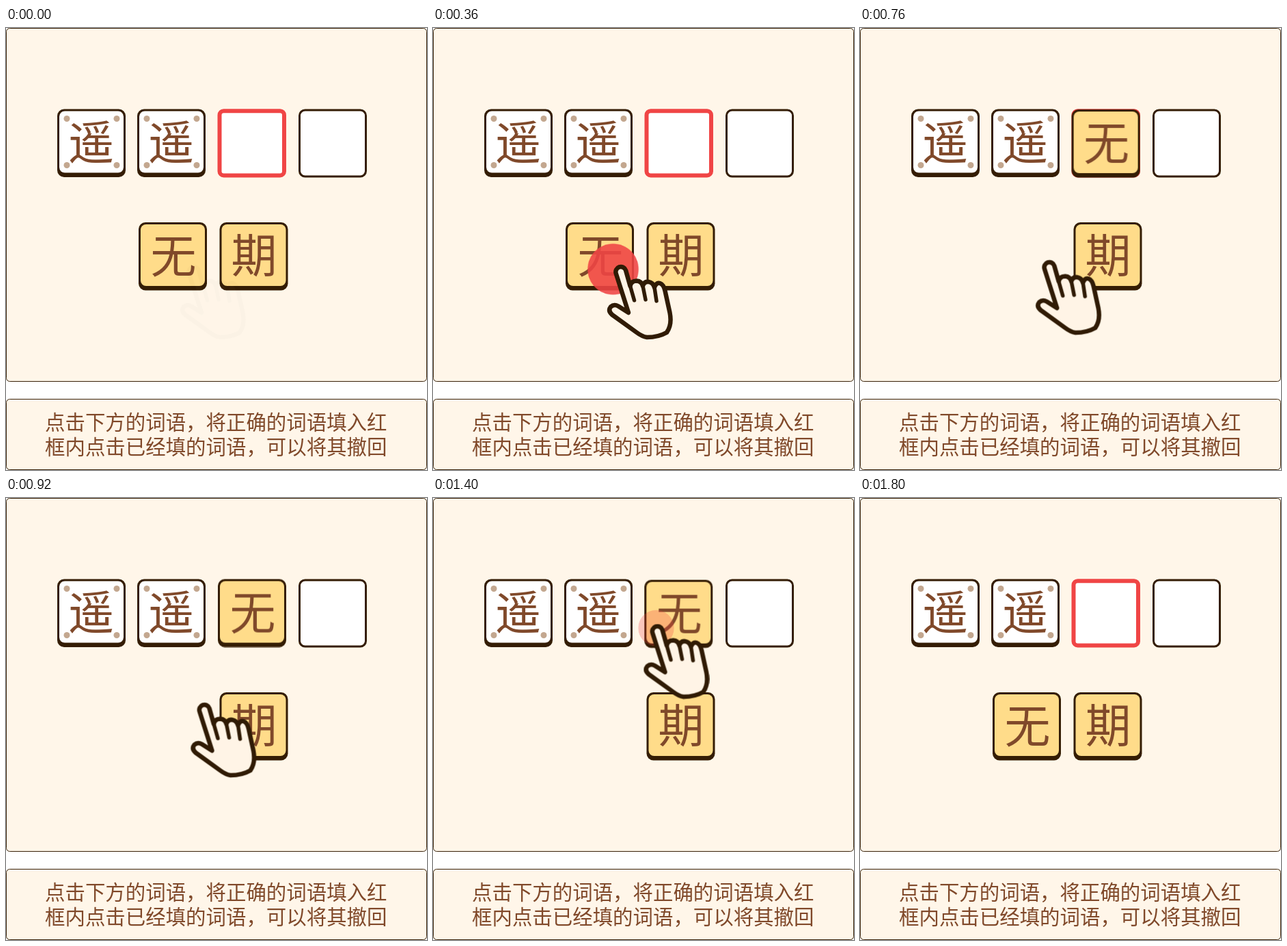
Recreate the animation shown at these times as an HTML page. Size 616 px wide and 646 px high, loop 1.84 s.

```html
<!DOCTYPE html>
<html lang="zh-CN">
<head>
<meta charset="utf-8">
<title>填词演示</title>
<style>
  html, body { margin: 0; width: 100%; height: 100%; overflow: hidden; background: #fff; }
  svg { display: block; width: 616px; height: 646px; }
  text { font-family: "Noto Sans CJK SC", "Noto Sans CJK", sans-serif; fill: #80492a; }
  .glyph { font-size: 67px; text-anchor: middle; }
  .hint { font-size: 29.45px; }
  .panel { fill: #fff6e9; stroke: #382007; }

  #piece, #slot, #hand, #pointer, .ripple { animation: 1840ms linear infinite; }
  #piece { animation-name: place; }
  #slot { animation-name: cover; }
  #hand { animation-name: travel; }
  #pointer { animation-name: show; }
  .ripple {
    fill: #f04545; opacity: 0;
    transform-box: fill-box; transform-origin: center;
    animation-name: ripple;
  }
  /* the second tap comes 1166 ms after the first */
  .second { animation-delay: -674ms; }

  @keyframes place {
    0% { transform: translate(194px, 284px); }
    20.54% { transform: translate(194px, 284px); animation-timing-function: ease-in-out; }
    42.28% { transform: translate(310px, 118.5px); }
    74.89% { transform: translate(310px, 118.5px); animation-timing-function: ease-in-out; }
    96.63%, 100% { transform: translate(194px, 284px); }
  }
  @keyframes cover {
    0%, 42.2% { opacity: 1; }
    42.21%, 76.4% { opacity: 0; }
    76.41%, 100% { opacity: 1; }
  }
  @keyframes travel {
    0% { transform: translate(0, 0); }
    35.87% { transform: translate(0, 0); animation-timing-function: ease-in-out; }
    73.91%, 100% { transform: translate(53.5px, -161.5px); }
  }
  @keyframes show {
    0% { opacity: 0; }
    4.35%, 93.48% { opacity: 1; }
    97.83%, 100% { opacity: 0; }
  }
  @keyframes ripple {
    0%, 10.54% { opacity: 0; transform: scale(.46); }
    18.7% { opacity: 1; transform: scale(.73); }
    26.85%, 100% { opacity: 0; transform: scale(1); }
  }
</style>
</head>
<body>
<svg viewBox="0 0 616 646">
  <defs>
    <g id="base">
      <rect width="100" height="99.5" rx="10" fill="#341d04"/>
      <rect x="3" y="3" width="94" height="90" rx="8"/>
    </g>
    <g id="fixed">
      <use href="#base" fill="#fff"/>
      <g fill="#c3a78f">
        <circle cx="14" cy="14" r="4.5"/>
        <circle cx="87" cy="14" r="4.5"/>
        <circle cx="14" cy="82" r="4.5"/>
        <circle cx="87" cy="82" r="4.5"/>
      </g>
      <text class="glyph" x="49.5" y="73">遥</text>
    </g>
  </defs>

  <rect class="panel" x=".5" y=".5" width="615" height="516" rx="5"/>
  <rect class="panel" x=".5" y="542.5" width="615" height="103" rx="5"/>
  <text class="hint" x="57" y="587">点击下方的词语，将正确的词语填入红</text>
  <text class="hint" x="57" y="623">框内点击已经填的词语，可以将其撤回</text>

  <use href="#fixed" x="75" y="118.5"/>
  <use href="#fixed" x="192" y="118.5"/>
  <rect id="slot" x="312.5" y="121.2" width="94.5" height="94.3" rx="6" fill="#fff" stroke="#f04545" stroke-width="6"/>
  <rect x="429.5" y="120" width="97" height="97" rx="8" fill="#fff" stroke="#341d04" stroke-width="3"/>

  <g transform="translate(312.5 284)">
    <use href="#base" fill="#ffdc8a"/>
    <text class="glyph" x="50.5" y="72.5">期</text>
  </g>
  <g id="piece">
    <use href="#base" fill="#ffdc8a"/>
    <text class="glyph" x="51" y="73.5">无</text>
  </g>

  <circle class="ripple" cx="263.5" cy="352.5" r="49"/>
  <circle class="ripple second" cx="326.5" cy="190" r="49"/>

  <g id="pointer">
    <g id="hand" fill="#fff4e6" stroke="#301b05" stroke-width="6.5" stroke-linecap="round" stroke-linejoin="round">
      <path d="M286 416 L267.8 359 A7.5 7.5 0 0 1 282 354 L288.500 377
        Q290 369.500 298 369.500 Q305 370 307 377
        Q309 370 315.500 371 Q322 372 324 379
        Q327 371.500 332 373 Q337.500 375 339.500 384
        L346.500 416 Q350 434 342 445 Q330 452 313 452
        Q306 451 298 445 L262 419 Q255.500 413 260 407.500
        Q265 403 271 406.500 Z"/>
      <path fill="none" stroke-width="5.5" d="M288.500 377 L294.500 398 M307 377 L311 397 M324 379 L327 399"/>
    </g>
  </g>
</svg>
</body>
</html>
```
